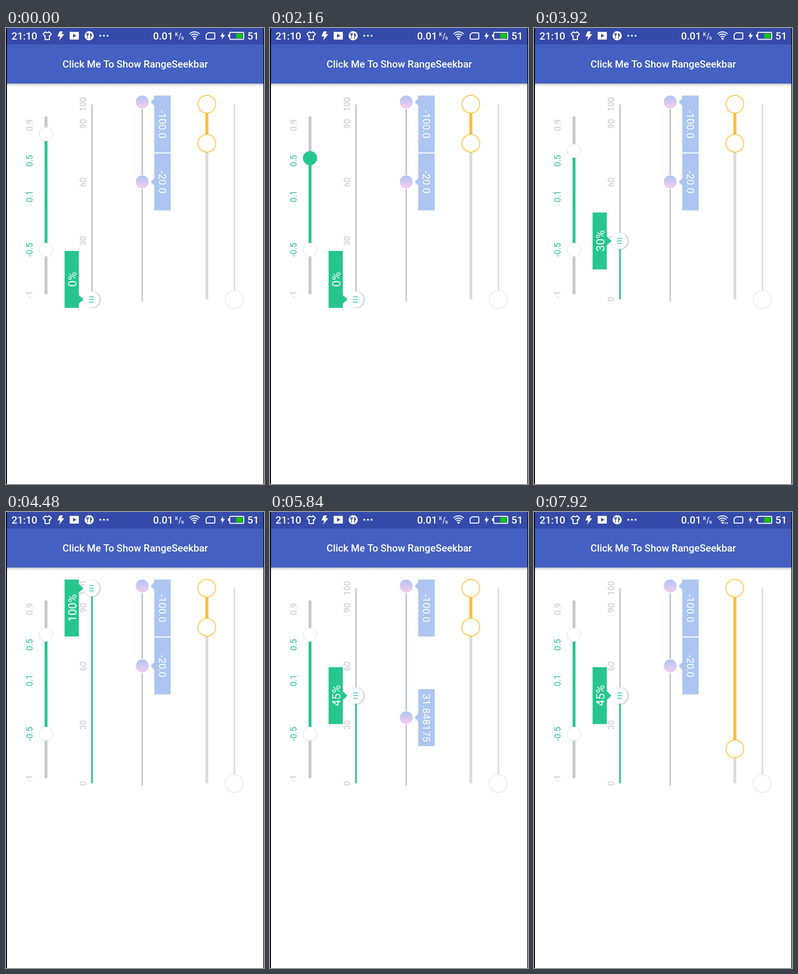
These frames come from a looping animation (535x945 px, 8000 ms). An HTML page with a canvas:

```html
<!DOCTYPE html>
<html lang="en">
<head>
<meta charset="utf-8">
<title>Vertical range sliders</title>
<style>
  html, body { margin: 0; width: 100%; height: 100%; overflow: hidden; background: #fff; }
  canvas { display: block; }
</style>
</head>
<body>
<canvas id="stage" width="535" height="945"></canvas>
<script>
const ctx = document.getElementById('stage').getContext('2d');
const LOOP = 8000, STEP = 80;
const GREEN = '#27c68e', GRAY = '#c8c8c8', PALE = '#dcdcdc';
const BLUE = '#acc6f1', YELLOW = '#ffc02d', BAR = '#354bab', TOOLBAR = '#4460c3';

// Drags as [time, value] points
const rangeDrag = [[1840, .8], [2160, .53], [2560, .12], [2720, .08], [3200, .6125]];
const percentDrag = [[3600, 0], [3920, 30], [4480, 100], [4720, 100], [5200, 45]];
const signedDrag = [[5440, -20], [5840, 31.848175], [6080, 100], [6160, 100], [6320, 66.173482], [6640, -20]];
const yellowDrag = [[7120, 238.9], [7920, 491]];
const wifiActivity = [[2880, 3360], [4880, 5200], [7600, 8000]];

function valueAt(points, t) {
  if (t <= points[0][0]) return points[0][1];
  for (let i = 1; i < points.length; i++) {
    const [t0, v0] = points[i - 1], [t1, v1] = points[i];
    if (t <= t1) return v0 + (v1 - v0) * (t - t0) / (t1 - t0);
  }
  return points[points.length - 1][1];
}

function rect(x, y, w, h, color, radius = 0) {
  ctx.fillStyle = color;
  ctx.beginPath();
  ctx.roundRect(x, y, w, h, radius);
  ctx.fill();
}

function track(x, top, bottom, width, color) {
  rect(x - width / 2, top, width, bottom - top, color, Math.min(2, width / 2));
}

function circle(x, y, r, fill, stroke, width = 1) {
  ctx.beginPath();
  ctx.arc(x, y, r, 0, Math.PI * 2);
  ctx.fillStyle = fill;
  ctx.fill();
  if (stroke) {
    ctx.strokeStyle = stroke;
    ctx.lineWidth = width;
    ctx.stroke();
  }
}

function fillPath(d, color) {
  ctx.fillStyle = color;
  ctx.fill(new Path2D(d));
}

function strokePath(d, color, width) {
  ctx.strokeStyle = color;
  ctx.lineWidth = width;
  ctx.stroke(new Path2D(d));
}

function text(str, x, baseline, size, weight = 400, align = 'left') {
  ctx.font = `${weight} ${size}px Roboto, sans-serif`;
  ctx.textAlign = align;
  ctx.fillStyle = '#fff';
  ctx.fillText(str, x, baseline);
}

// Centred text turned a quarter: -1 reads upwards, 1 downwards
function turnedText(str, x, y, size, color, turn = -1) {
  ctx.save();
  ctx.translate(x, y);
  ctx.rotate(turn * Math.PI / 2);
  ctx.font = `${size}px Roboto, sans-serif`;
  ctx.textAlign = 'center';
  ctx.fillStyle = color;
  ctx.fillText(str, 0, size * .355);
  ctx.restore();
}

// The box stays inside the slider while its pointer follows the thumb
const boxTop = y => Math.max(140, Math.min(462, y - 59));

function statusBar(t) {
  rect(0, 0, 535, 34, BAR);
  text('21:10', 11.5, 24, 21, 500);
  strokePath('M82 8 L77 12 L79.5 16.5 L81 16 V24 H90 V16 L91.5 16.5 L94 12 L89 8 Q85.5 12 82 8Z', '#fff', 2);
  fillPath('M111 7 H118 L115.5 13 H121 L110 26 L112.5 17.5 H106.5Z', '#fff');
  rect(132, 8, 19, 16, '#fff', 1);
  fillPath('M139 12 L146 16 L139 20Z', BAR);
  circle(172.5, 16, 9.5, '#fff');
  strokePath('M167 10 V13 Q167 15 169 15 Q171 15 171 13 V10 M169 10 V22', BAR, 1.3);
  fillPath('M174.5 22 V10 Q178.5 11 178 17 H176.3 V22Z', BAR);
  for (const x of [195.5, 203, 210.5]) circle(x, 16, 2, '#fff');

  text('0.01', 305, 24, 21, 500);
  text('K', 350.5, 17, 10.5, 500);
  strokePath('M358.5 24 L363 10', '#fff', 1.3);
  text('s', 363, 24, 11.5, 500);
  wifi(wifiActivity.some(([from, to]) => t >= from && t < to));
  strokePath('M419 10 H431.5 Q433 10 433 11.5 V21.5 Q433 23 431.5 23 H416.5 Q415 23 415 21.5 V14Z', '#fff', 2);
  fillPath('M450 9 L444.5 17.5 H448.5 L447 24 L454 14.5 H450Z', '#fff');
  rect(460.5, 13, 3, 6, '#fff', 1);
  ctx.lineWidth = 2;
  ctx.strokeStyle = '#fff';
  ctx.beginPath();
  ctx.roundRect(464, 9, 29, 14.5, 2);
  ctx.stroke();
  rect(477.5, 11, 13.5, 10.5, '#12c40c');
  text('51', 500.5, 24, 21, 500);
}

function wifi(active) {
  ctx.strokeStyle = '#fff';
  ctx.lineWidth = 2;
  for (const r of [6, 10.5, 15]) {
    ctx.beginPath();
    ctx.arc(391, 23, r, -Math.PI * .75, -Math.PI * .25);
    ctx.stroke();
  }
  fillPath('M388 21.5 Q391 18.5 394 21.5 L391 25Z', '#fff');
  if (active) {
    rect(394, 18, 9, 8, BAR);
    fillPath('M394.5 22 H398 L396.2 25.5Z M399 22 H402.5 L400.7 25.5Z', '#fff');
  }
}

function toolbar() {
  const shadow = ctx.createLinearGradient(0, 115, 0, 122);
  shadow.addColorStop(0, '#b8b8bc');
  shadow.addColorStop(.4, '#e6e6e8');
  shadow.addColorStop(1, '#fff');
  rect(0, 115, 535, 7, shadow);
  rect(0, 34, 535, 81, TOOLBAR);
  text('Click Me To Show RangeSeekbar', 268, 82, 20.6, 500, 'center');
}

function steppedRange(t) {
  const x = 83, low = -.5, high = valueAt(rangeDrag, t);
  const yOf = v => 367.5 - 184.5 * v;
  for (const v of [.9, .5, .1, -.5, -1]) {
    turnedText(String(v), 49, yOf(v), 17.7, v >= low && v <= high ? GREEN : GRAY);
  }
  track(x, 183, 552, 6, GRAY);
  track(x, yOf(high), yOf(low), 6, GREEN);
  const pressed = t >= 1920 && t < 3200;
  circle(x, yOf(low), 14.3, '#fff', PALE);
  circle(x, yOf(high), 14.3, pressed ? GREEN : '#fff', pressed ? GREEN : PALE);
}

function percentSlider(t) {
  const percent = valueAt(percentDrag, t);
  const yOf = p => 562.5 - 4.045 * p;
  const y = yOf(percent), top = boxTop(y);
  for (const p of [100, 90, 60, 30, 0]) turnedText(String(p), 160, yOf(p), 17.7, GRAY);
  track(178.3, 158, 562.5, 3.2, GRAY);
  if (percent > 0) track(178.3, y, 562.5, 3.2, GREEN);

  rect(121.5, top, 29.5, 118, GREEN);
  fillPath(`M150.5 ${y - 9.5} L160.5 ${y} L150.5 ${y + 9.5}Z`, GREEN);
  turnedText(Math.round(percent) + '%', 137.5, top + 59, 23.8, '#fff');

  ctx.save();
  ctx.shadowColor = 'rgba(0,0,0,.3)';
  ctx.shadowBlur = 3;
  ctx.shadowOffsetX = 1.5;
  ctx.shadowOffsetY = .5;
  circle(177, y, 17, '#fff');
  ctx.restore();
  for (const dy of [-5.5, 0, 5.5]) rect(172.5, y + dy - .75, 9.5, 1.5, GREEN);
}

function signedThumb(y, value) {
  const top = boxTop(y);
  const fill = ctx.createLinearGradient(0, y - 13, 0, y + 13);
  fill.addColorStop(0, BLUE);
  fill.addColorStop(1, '#fbcbee');
  circle(282.5, y, 15, '#fff');
  circle(282.5, y, 13.4, fill);
  rect(307.5, top, 34, 118, BLUE);
  fillPath(`M308 ${y - 8} L300 ${y} L308 ${y + 8}Z`, BLUE);
  const label = Number.isInteger(value) ? value.toFixed(1) : value.toPrecision(8);
  turnedText(label, 324.5, top + 59.5, 21, '#fff', 1);
}

function signedRange(t) {
  const value = valueAt(signedDrag, t);
  const yOf = v => 153.5 + (v + 100) * 2.069;
  track(282.5, 153.5, 567, 3, GRAY);
  track(282.5, 153.5, yOf(value), 3, BLUE);
  signedThumb(yOf(-100), -100);
  signedThumb(yOf(value), value);
}

function yellowRange(t) {
  const x = 416.5, y = valueAt(yellowDrag, t);
  track(x, 158, 562.5, 6, PALE);
  track(x, 158, y, 6, YELLOW);
  for (const thumbY of [158, y]) circle(x, thumbY, 18.4, '#fff', YELLOW, 1.7);
}

function plainSlider() {
  track(473.5, 158, 562.5, 3, PALE);
  circle(473.5, 562.5, 18.7, '#fff', PALE, 1.1);
}

function draw(now) {
  const t = Math.floor((now % LOOP) / STEP) * STEP;
  rect(0, 0, 535, 945, '#fff');
  toolbar();
  statusBar(t);
  steppedRange(t);
  percentSlider(t);
  signedRange(t);
  yellowRange(t);
  plainSlider();
  rect(0, 0, 2, 945, '#000');
  rect(533.7, 0, 1.3, 945, '#000');
}

let start;
function frame(now) {
  start ??= now;
  draw(now - start);
  requestAnimationFrame(frame);
}
draw(0);
requestAnimationFrame(frame);
</script>
</body>
</html>
```
